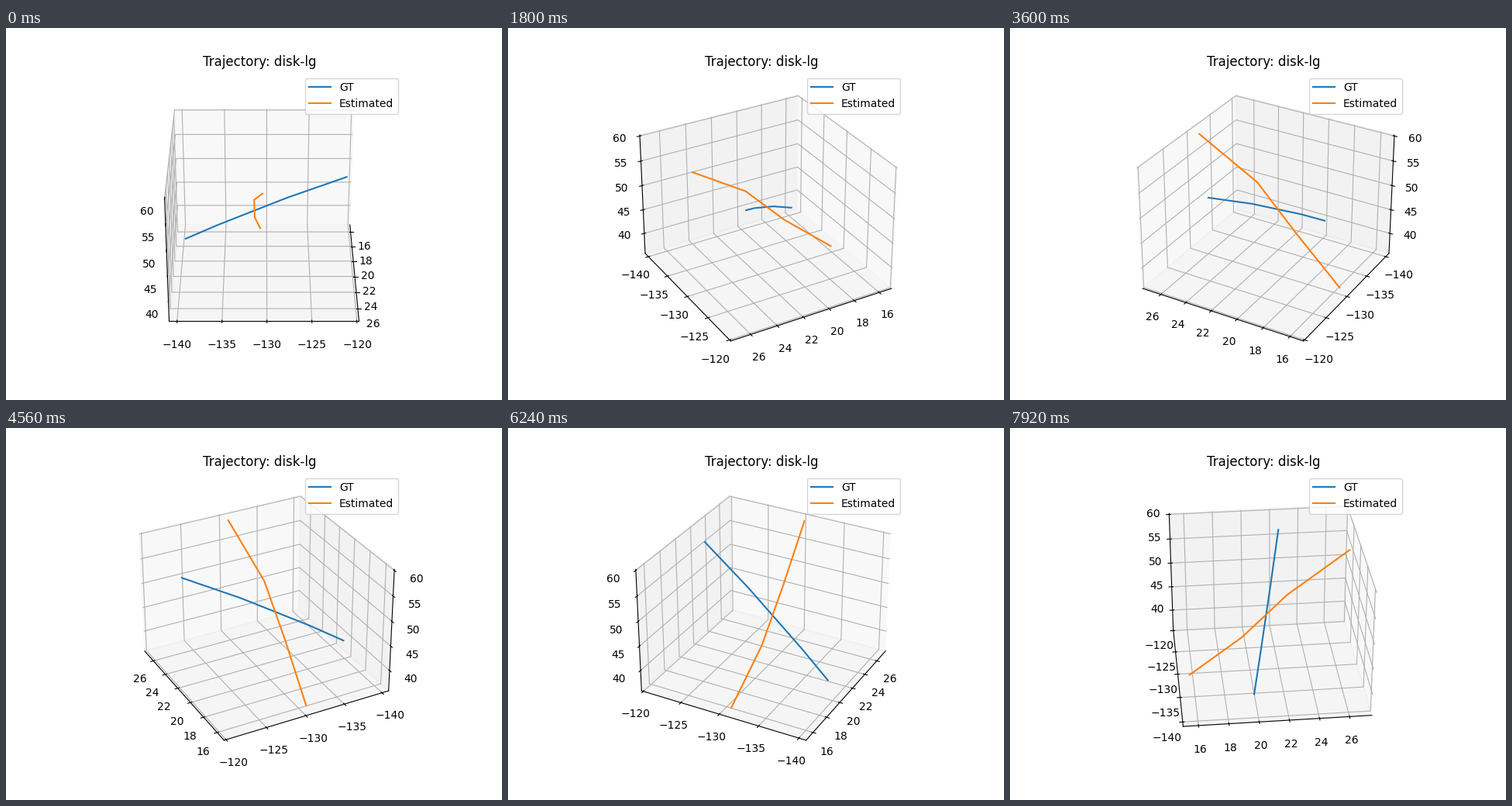
A matplotlib script for the animation above (8000 ms loop, 640 by 480 pixels).

```python
import matplotlib.pyplot as plt
import numpy as np
from matplotlib.animation import FuncAnimation

STEP_MS = 40       # timer tick
HOLD = 3           # ticks per view, so the view turns every 120 ms
LOOP_MS = 8000
TURN = 4           # degrees per view


def ground_truth():
    """A gently bending path, described by the distance run along y."""
    d = np.array([0, 3.94, 11.86, 18.44])
    x = 19.75 + 0.1619 * d - 0.0006 * d**2
    y = -139.54 + d
    z = 40.12 + 1.0255 * d - 0.0063 * d**2
    return np.array([x, y, z])


def estimated():
    """Four key points of the estimated path."""
    return np.array([
        (26.69, -130.49, 59.71),
        (22.455, -131.44, 52.24),
        (19.39, -131.42, 44.07),
        (15.79, -130.79, 36.23),
    ]).T


def padded(values, margin):
    """Data range with a relative margin, then the 3D box's own 1/48."""
    lo, hi = values.min(), values.max()
    for m in (margin, 1 / 48):
        pad = (hi - lo) * m
        lo, hi = lo - pad, hi + pad
    return lo, hi


fig = plt.figure(figsize=(6.4, 4.8), dpi=100)
ax = fig.add_subplot(projection="3d")
paths = {"GT": ground_truth(), "Estimated": estimated()}
for label, path in paths.items():
    ax.plot(*path, label=label)

xs, ys, zs = np.hstack(list(paths.values()))
ax.set(xlim=padded(xs, 0.05), ylim=padded(ys, 0.05), zlim=padded(zs, 0))
ax.set_title("Trajectory: disk-lg", x=0.4973)
ax.legend(loc="upper right")


def update(i):
    ax.view_init(elev=30, azim=TURN * (i // HOLD))
    return ()


anim = FuncAnimation(
    fig,
    update,
    frames=LOOP_MS // STEP_MS,
    init_func=lambda: update(0),
    interval=STEP_MS,
    repeat=True,
    repeat_delay=0,
)
plt.show()
```
